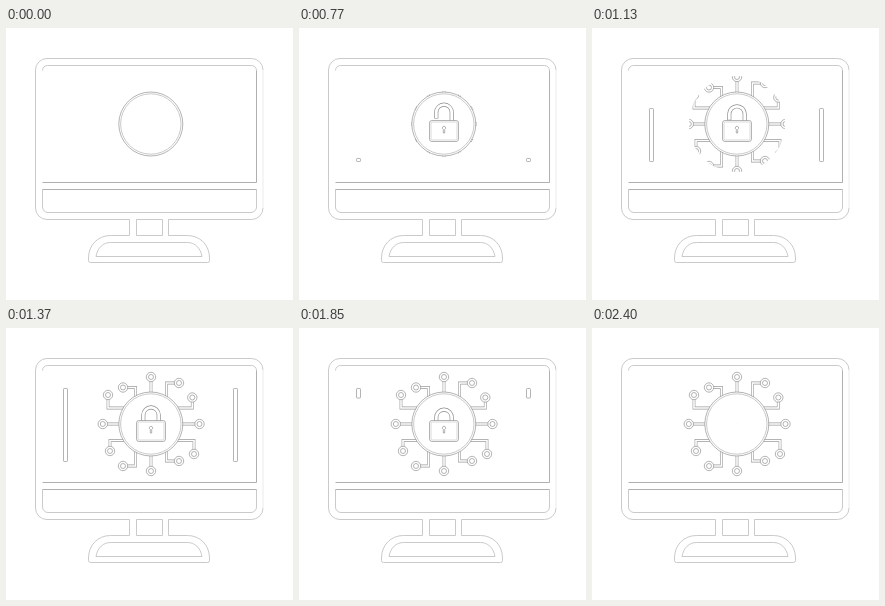
An HTML page that plays this animation: 287 by 272 pixels, repeating every 2.46 s.

```html
<!DOCTYPE html>
<html lang="en">
<head>
<meta charset="utf-8">
<title>Secure computer</title>
<style>
  html, body { margin: 0; width: 100%; height: 100%; overflow: hidden; background: #fff; }
  svg { display: block; width: 100vw; height: 100vh; }
  .line, .dark, .pale { fill: none; stroke-width: .8; }
  .line { stroke: #bdbdbd; }
  .dark { stroke: #9c9c9c; }
  .pale { stroke: #e6e6e6; }
  .ink { fill: #fff; stroke: #8c8c8c; stroke-width: .65; }
</style>
</head>
<body>
<svg viewBox="0 0 287 272" xmlns="http://www.w3.org/2000/svg">
  <defs>
    <clipPath id="reveal"><circle id="mask" cx="145" cy="96" r="0"/></clipPath>
  </defs>

  <!-- monitor -->
  <path class="line" d="M123.5 191.5H41A11.5 11.5 0 0 1 29.5 180V42A11.5 11.5 0 0 1 41 30.5H245.5A11.5 11.5 0 0 1 257 42"/>
  <path class="pale" d="M257 42V180"/>
  <path class="line" d="M257 180A11.5 11.5 0 0 1 245.5 191.5H162.5"/>
  <path class="line" d="M36.5 42.5a5 5 0 0 1 5-5H245.5a5 5 0 0 1 5 5"/>
  <path class="line" d="M36.5 161.5V179a5.5 5.5 0 0 0 5.5 5.5H245a5.5 5.5 0 0 0 5.5-5.5V161.5"/>
  <path class="dark" d="M250.5 42.5V154.5H36.5M36.5 161.5H250.5"/>

  <!-- stand -->
  <path class="line" d="M123.5 191.5V207.5H104.5C92 207.5 82.5 217 82.5 230V232.5q0 2 2 2H201.5q2 0 2-2V230C203.5 217 194 207.5 181.5 207.5H162.5V191.5"/>
  <path class="line" d="M130.5 191.5H156.5V207.5H130.5Z"/>
  <path class="line" d="M90 228.5C91.500 219.5 97.5 214.5 104.5 214.5H181.5C188.5 214.5 194.5 219.5 196 228.5Z"/>

  <g id="bars"></g>
  <g id="circuit" clip-path="url(#reveal)"></g>

  <circle class="ink" cx="144.8" cy="96" r="32"/>
  <circle class="line" cx="144.8" cy="96" r="30.2" stroke-width=".6"/>

  <g id="lock">
    <g id="shackle" fill="none">
      <path d="M137.3 90.6V84.3a7.7 7.7 0 0 1 15.4 0V97" stroke="#8c8c8c" stroke-width="4.100"/>
      <path d="M137.3 90V84.3a7.7 7.7 0 0 1 15.4 0V97" stroke="#fff" stroke-width="2.800"/>
    </g>
    <rect class="ink" x="130.5" y="92.5" width="29" height="21" rx="2.5"/>
    <rect class="line" x="132" y="94" width="26" height="18" rx="1.5" stroke-width=".5" stroke-opacity=".7"/>
    <path class="ink" d="M144.300 101.300V105H145.700V101.300A1.600 1.600 0 1 0 144.300 101.300Z"/>
  </g>
</svg>
<script>
  const LOOP = 2460, STEP = 60;
  const BAR_TOP = 60.5, BAR_END = 133.5;
  const $ = id => document.getElementById(id);
  const clamp = (v, lo, hi) => Math.max(lo, Math.min(hi, v));
  const stepAt = (t, start) => Math.floor((t - start) / STEP);

  function add(parent, tag, attrs) {
    const el = document.createElementNS('http://www.w3.org/2000/svg', tag);
    for (const key in attrs) el.setAttribute(key, attrs[key]);
    parent.append(el);
    return el;
  }

  // each branch: node centre, then the route back to the hub
  const branches = [
    [145, 49, 'V68'], [173, 55, 'H160.5V70'], [186.3, 69.5, 'V80H168'],
    [193.5, 96, 'H174'], [188, 126, 'V112.5H168'], [173, 133, 'H160.5V120'],
    [145, 143, 'V124'], [117, 138, 'H129.5V120'], [104, 123, 'V112.5H120'],
    [96.8, 96, 'H116'], [102, 67, 'V80H120'], [117, 59.5, 'H129.5V70']
  ];
  for (const [x, y, route] of branches) {
    const d = `M${x} ${y}${route}`;
    add($('circuit'), 'path', { d, fill: 'none', stroke: '#9b9b9b', 'stroke-width': 2.8 });
    add($('circuit'), 'path', { d, fill: 'none', stroke: '#fff', 'stroke-width': 1.6 });
    add($('circuit'), 'circle', { cx: x, cy: y, r: 4.7, class: 'ink' });
    add($('circuit'), 'circle', { cx: x, cy: y, r: 2.5, class: 'ink' });
  }

  const bars = [57.5, 227.5].map(x =>
    add($('bars'), 'rect', { x, width: 4, rx: .8, class: 'ink' }));

  function lockScale(t) {
    if (t < 200) return 0;
    if (t < 2160) {
      const u = clamp((stepAt(t, 200) + 1) / 5, 0, 1);
      return 1 - Math.pow(1 - u, 1.25);
    }
    return Math.max(.024, .8 - .194 * stepAt(t, 2160));
  }

  function draw(t) {
    const k = clamp(stepAt(t, 770), -1, 20);

    const s = lockScale(t);
    $('lock').setAttribute('display', s ? 'inline' : 'none');
    $('lock').setAttribute('transform', `translate(145 96) scale(${s}) translate(-145 -96)`);
    $('shackle').setAttribute('transform', `translate(0 ${.28 * Math.max(0, k)})`);

    $('mask').setAttribute('r', k < 0 ? 0 : Math.min(60, 33 + 2.5 * k));

    // bars rise from the bottom, then leave through the top
    const top = Math.max(BAR_TOP, BAR_END - 3 - 8.33 * k);
    const end = Math.min(BAR_END, 70 + 8.33 * (18 - k));
    const h = k < 0 ? 0 : Math.max(0, end - top);
    for (const bar of bars) {
      bar.setAttribute('display', h ? 'inline' : 'none');
      bar.setAttribute('y', top);
      bar.setAttribute('height', h);
    }
  }

  const begin = performance.now();
  function tick() {
    draw((performance.now() - begin) % LOOP);
    requestAnimationFrame(tick);
  }
  draw(0);
  requestAnimationFrame(tick);
</script>
</body>
</html>
```
